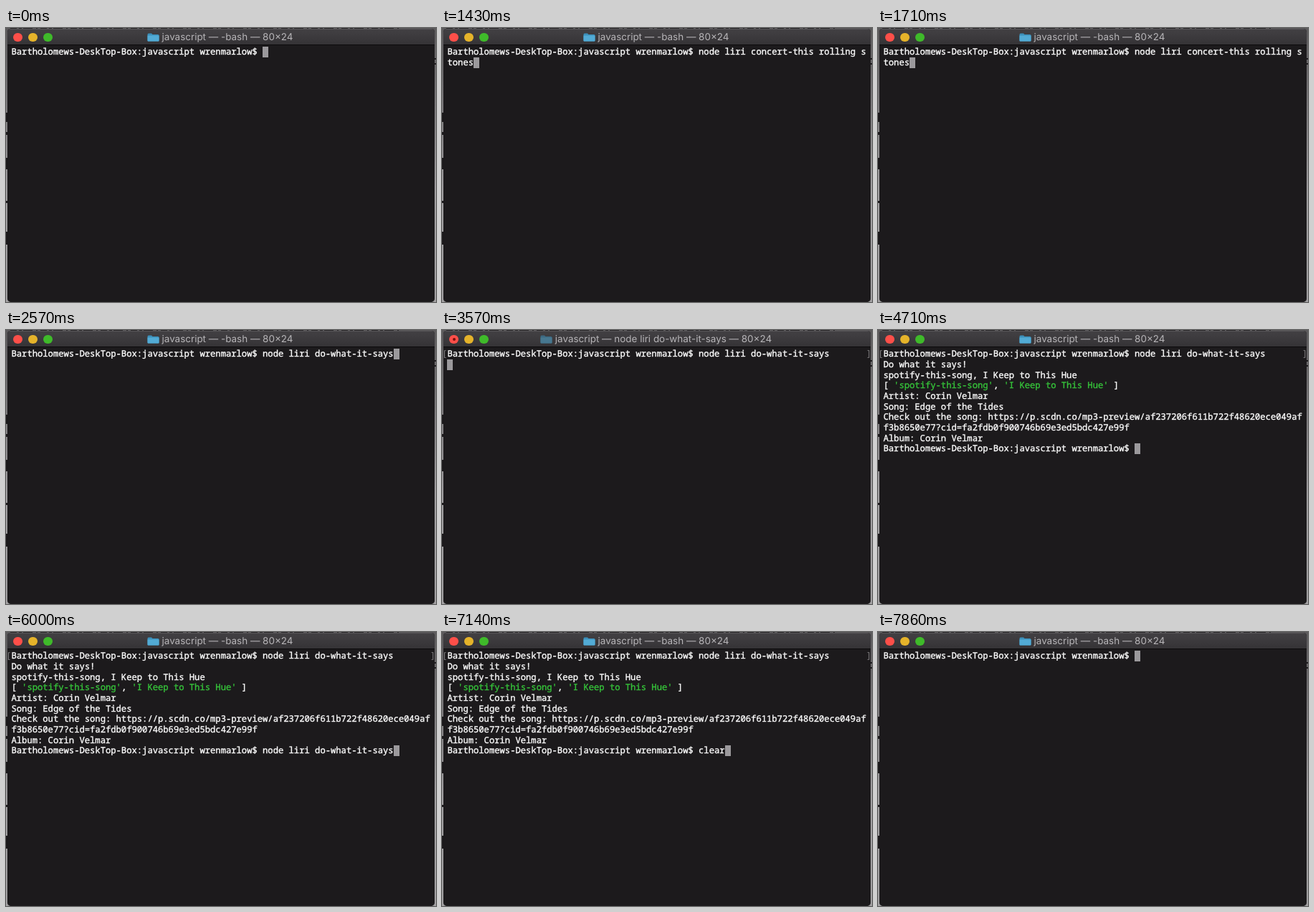
An HTML page that plays this animation: 600 px wide and 382 px high, repeating every 8000 ms.

```html
<!DOCTYPE html>
<html lang="en">
<head>
<meta charset="utf-8">
<title>Terminal</title>
<style>
  html, body { margin: 0; width: 600px; height: 382px; overflow: hidden; }
  body { position: relative; background: linear-gradient(#5c5a5c, #a5a3a5 60%); }
  #backdrop { position: absolute; left: 0; top: 0; }
  #window {
    position: absolute; left: 2px; top: 1px; width: 596px; height: 381px;
    border-radius: 5px; background: #1c1a1c; overflow: hidden;
    box-shadow: 0 0 1px #222;
  }
  #bar {
    height: 22px; border-bottom: 1px solid #0c0b0c;
    background: linear-gradient(#434144, #353336);
    box-shadow: inset 0 1px #59575a;
  }
  .light {
    position: absolute; top: 5.7px; width: 12.4px; height: 12.4px; border-radius: 50%;
  }
  #dot {
    position: absolute; left: 4.2px; top: 4.2px; width: 4px; height: 4px;
    border-radius: 50%; background: #76100f;
  }
  #title {
    position: absolute; left: 0; top: 1px; width: 593px; height: 22px;
    display: flex; align-items: center; justify-content: center; gap: 4px;
    font: 13.45px Inter, sans-serif; color: #b7b5b8; white-space: pre;
    text-rendering: geometricPrecision;
  }
  #screen, .mark {
    position: absolute; margin: 0; top: 26.3px; color: #fff; white-space: pre;
    font: 500 12.1875px/14.65px "Noto Sans Mono", monospace;
    text-rendering: geometricPrecision; font-variant-ligatures: none;
  }
  #screen { left: 7.5px; -webkit-text-stroke: .35px; }
  #screen span { color: #36c43a; }
  .mark { color: #858385; font-weight: 400; }
  #cursor { position: absolute; width: 8px; height: 15px; background: #9b999c; }
</style>
</head>
<body>
<svg id="backdrop" width="600" height="382">
  <path d="M6 .5H552" stroke="#252325" stroke-dasharray="9 3 4 2 13 5 2 4"/>
  <path d="M1 118v13M1 145v4M1 181v16M1 241v3M1 284v18M599 42v2M599 49v2" stroke="#1a181a" stroke-width="2"/>
</svg>
<div id="window">
  <div id="bar"></div>
  <div class="light" style="left:8.4px;background:#fd4f49"><div id="dot"></div></div>
  <div class="light" style="left:29.4px;background:#e5b32a"></div>
  <div class="light" style="left:50.4px;background:#3fba2a"></div>
  <div id="title">
    <svg id="folder" width="17" height="12">
      <path d="M.5 2q0-1.5 1.5-1.5h4l1.5 1.5h7.5q1.5 0 1.5 1.5v7q0 1-1 1h-14q-1 0-1-1z" fill="#3c90ba"/>
      <path d="M.5 3.5h16v7q0 1-1 1h-14q-1 0-1-1z" fill="#52abd5"/>
    </svg><span id="caption"></span>
  </div>
</div>
<div id="cursor"></div>
<pre id="screen"></pre>
<div class="mark" style="left:0">[</div>
<div class="mark" style="left:592px">]</div>
<script>
const LOOP = 8000, COLS = 80, CELL = 7.3125, ROW = 14.65, LEFT = 7.5, TOP = 26.3;
const $ = id => document.getElementById(id);

const prompt = 'Bartholomews-DeskTop-Box:javascript wrenmarlow$ ';
const says = 'node liri do-what-it-says';
const concert = 'node liri concert-this rolling stones';
const run = prompt + says + '\n';
const greeting = run + 'Do what it says!\n';
const parsed = greeting + `spotify-this-song, I Keep to This Hue
[ 'spotify-this-song', 'I Keep to This Hue' ]
`;
const result = parsed + `Artist: Corin Velmar
Song: Edge of the Tides
Check out the song: https://p.scdn.co/mp3-preview/af237206f611b722f48620ece049aff3b8650e77?cid=fa2fdb0f900746b69e3ed5bdc427e99f
Album: Corin Velmar
`;

// [start in ms, screen text, program is running]
const steps = [
  [0, prompt],
  [1290, prompt + 'clear'],
  [1430, prompt + concert],
  [1570, prompt + 'clear'],
  [1710, prompt + concert],
  [2570, prompt + says],
  [3430, run],
  [3570, run, true],
  [3710, greeting, true],
  [3860, parsed, true],
  [4140, result, true],
  [4290, result + prompt],
  [5570, result + prompt + says],
  [6570, result + prompt + 'clear'],
  [7860, prompt],
];

let shown;

function show(step) {
  const [, text, busy] = step;
  const wrapped = text.replace(new RegExp(`.{${COLS}}(?=.)`, 'g'), '$&\n');
  const rows = wrapped.split('\n');
  $('screen').innerHTML = wrapped.replace(/'[^']*'/g, '<span>$&</span>');
  $('cursor').style.left = Math.floor(LEFT + rows.at(-1).length * CELL) + 'px';
  $('cursor').style.top = Math.round(TOP + (rows.length - 1) * ROW) + 'px';
  $('caption').textContent = `javascript — ${busy ? says : '-bash'} — 80×24`;
  $('folder').style.opacity = busy ? 0.55 : 1;
  $('dot').hidden = !busy;
  for (const mark of document.querySelectorAll('.mark')) mark.hidden = !text.startsWith(run);
}

function tick() {
  const t = performance.now() % LOOP;
  const step = steps.findLast(([start]) => start <= t);
  if (step !== shown) show(shown = step);
  requestAnimationFrame(tick);
}
tick();
</script>
</body>
</html>
```
